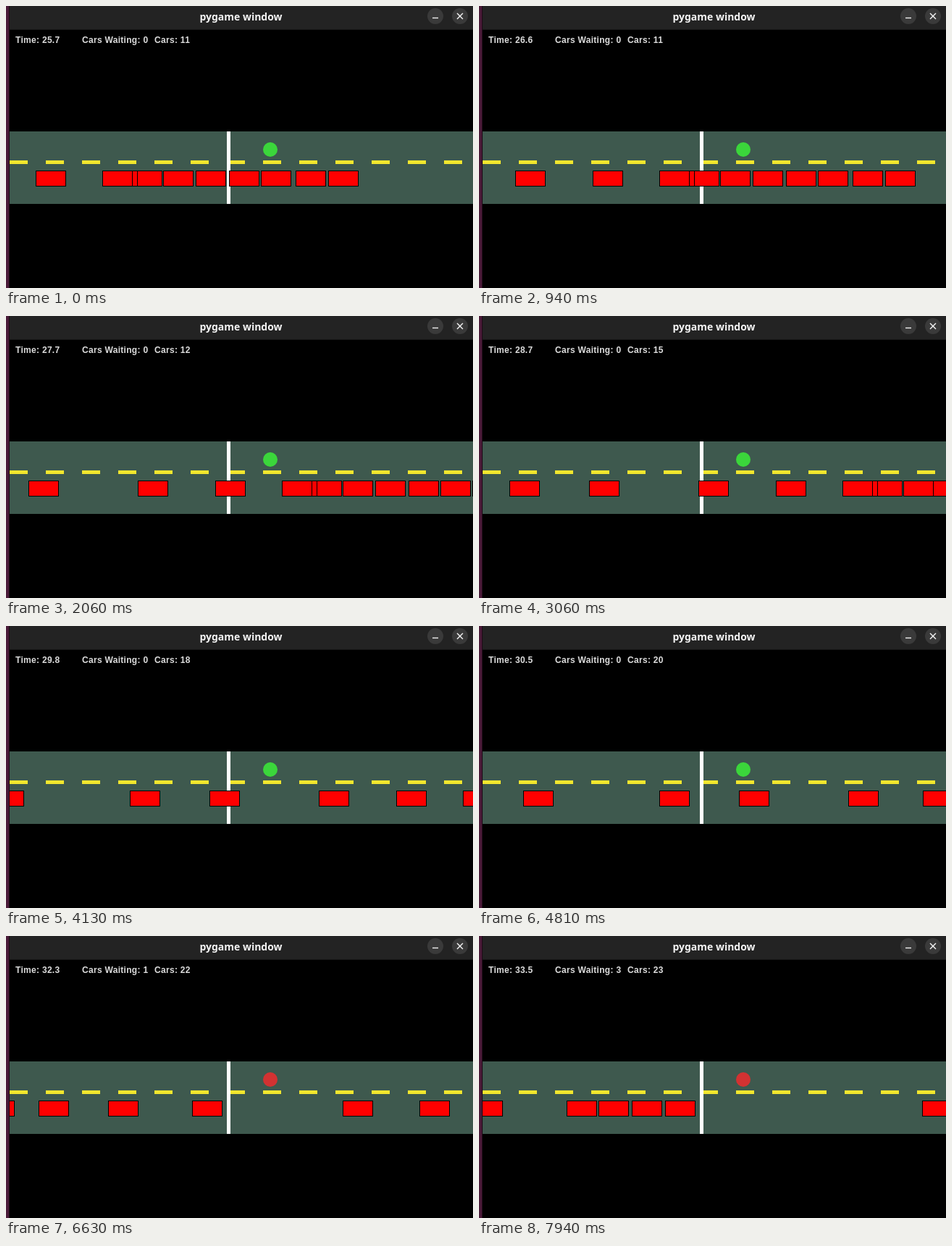
Animation, 645 px wide and 389 px high, one loop 8000 ms. Source, as an HTML page with a canvas:

```html
<!DOCTYPE html>
<html lang="en">
<head>
<meta charset="utf-8">
<title>pygame window</title>
<style>
  html, body { margin: 0; width: 100%; height: 100%; overflow: hidden; background: #000; }
  canvas { display: block; }
</style>
</head>
<body>
<canvas id="stage" width="645" height="389"></canvas>
<script>
const ctx = document.getElementById('stage').getContext('2d');

const LOOP = 8000, FRAME = 62.5;
const EXIT_X = 645, SKIP = 4, RED_AT = 755;

// Distance travelled by free cars: [tick, pixels]
const TRAVEL = [[0, 0], [15, 116], [33, 248], [66, 498], [89, 662], [106, 792], [127, 943]];

// Cars from front to back: starting x and, for those held at the light, where they stop
const CARS = [
  [445], [400], [352], [308], [262], [217], [174], [140], [133], [41], [-66], [-217], [-327],
  [-515, 257], [-651, 211], [-747, 165], [-822, 121], [-952, 77]
];

function travelled(tick) {
  const i = Math.max(1, TRAVEL.findIndex(p => p[0] >= tick));
  const [t0, d0] = TRAVEL[i - 1], [t1, d1] = TRAVEL[i];
  return Math.round(d0 + (d1 - d0) * (tick - t0) / (t1 - t0));
}

// Ticks begin on whole hundredths of a second
function tickAt(ms) {
  return Math.min(127, Math.ceil((Math.floor(ms / 10) + 0.5) * 10 / FRAME) - 1);
}

function traffic(distance) {
  let exited = 0, waiting = 0, aheadGone = false;
  const xs = CARS.map(([start, stop = Infinity]) => {
    // A car misses one step when the one ahead leaves the road
    const x = start + distance - (aheadGone ? SKIP : 0);
    aheadGone = x > EXIT_X && stop === Infinity;
    if (aheadGone) exited++;
    if (x > stop) waiting++;
    return Math.min(x, stop);
  });
  return { xs, exited, waiting };
}

function box(color, x, y, w, h) {
  ctx.fillStyle = color;
  ctx.fillRect(x, y, w, h);
}

function disc(color, x, y, r) {
  ctx.fillStyle = color;
  ctx.beginPath();
  ctx.arc(x, y, r, 0, Math.PI * 2);
  ctx.fill();
}

function line(...points) {
  ctx.beginPath();
  points.forEach(([x, y], i) => i ? ctx.lineTo(x, y) : ctx.moveTo(x, y));
  ctx.stroke();
}

function label(text, x) {
  ctx.fillText(text, x, 51);
}

function drawRoad(red) {
  box('#3e594e', 5, 173, 640, 100);
  for (let x = 5; x < 645; x += 50) box('#f2e62e', x, 213, 25, 5);
  box('#fff', 305, 173, 5, 100);
  disc(red ? '#d23232' : '#3bd63b', 365, 198, 10);
}

function drawCar(x) {
  box('#000', x, 227, 42, 22);
  box('#f00', x + 1, 228, 40, 20);
}

function drawWindow() {
  box('#4a1a38', 0, 0, 4, 389);
  box('#1c0a16', 4, 0, 1, 389);
  box('#232323', 5, 0, 640, 32);
  box('#181818', 5, 32, 640, 1);

  ctx.fillStyle = '#f4f4f4';
  ctx.font = '700 14px "Noto Sans", sans-serif';
  ctx.letterSpacing = '0px';
  ctx.textAlign = 'center';
  ctx.fillText('pygame window', 324.5, 20);

  disc('#3a3a3a', 593, 14, 11);
  disc('#3a3a3a', 627, 14, 11);
  ctx.strokeStyle = '#f0f0f0';
  ctx.lineWidth = 1.4;
  line([589, 16.5], [597, 16.5]);
  line([623, 10], [631, 18]);
  line([631, 10], [623, 18]);
}

function drawStatus(distance, waiting, exited) {
  const clock = Math.floor((25.71 + distance / 120) * 10) / 10;
  ctx.fillStyle = '#dcdcdc';
  ctx.font = '700 12px "Liberation Sans", Arial, sans-serif';
  ctx.letterSpacing = '0.3px';
  ctx.textAlign = 'left';
  label('Time: ' + clock.toFixed(1), 13);
  label('Cars Waiting: ' + waiting, 105);
  label('Cars: ' + (11 + exited), 205);
}

function draw(ms) {
  const distance = travelled(tickAt(ms));
  const { xs, exited, waiting } = traffic(distance);
  box('#000', 0, 0, 645, 389);
  drawRoad(distance >= RED_AT);
  xs.forEach(drawCar);
  drawWindow();
  drawStatus(distance, waiting, exited);
}

const began = performance.now();
function loop() {
  draw((performance.now() - began) % LOOP);
  requestAnimationFrame(loop);
}
loop();
</script>
</body>
</html>
```
